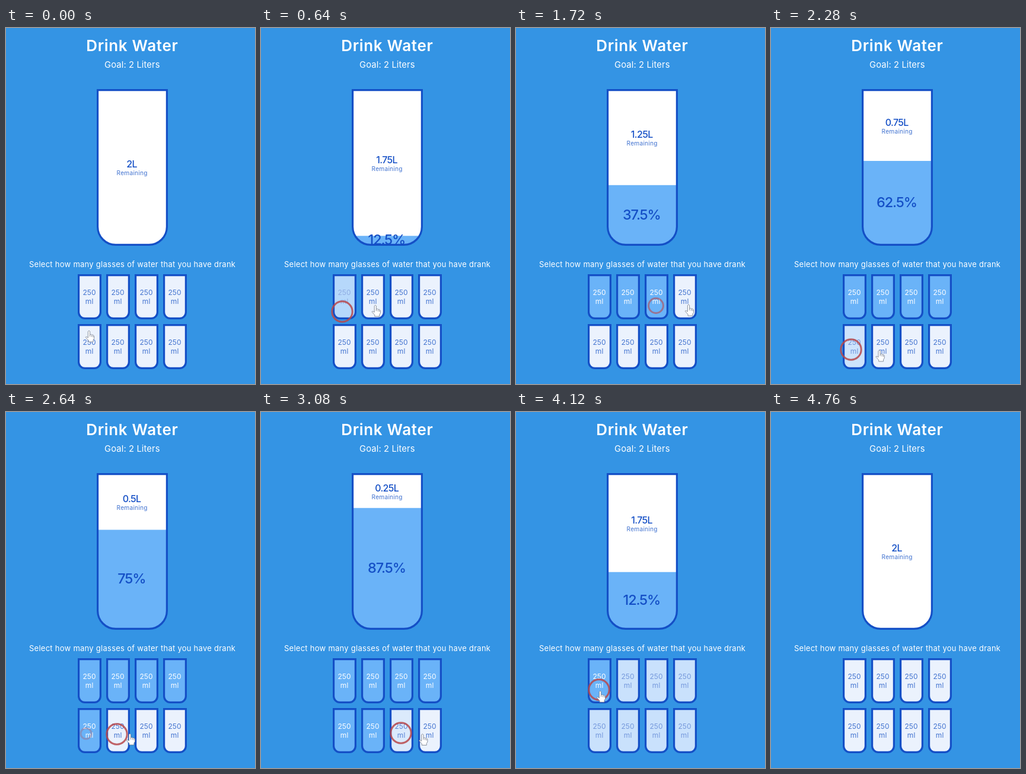
Animation of 420 by 600 pixels, one loop 5130 ms. Source, as an HTML page with a canvas:

```html
<!DOCTYPE html>
<html lang="en">
<head>
<meta charset="utf-8">
<title>Drink Water</title>
<style>
  html, body { margin: 0; width: 100%; height: 100%; overflow: hidden; background: #3494e4; }
  canvas { display: block; }
</style>
</head>
<body>
<canvas id="stage" width="420" height="600"></canvas>
<script>
const ctx = document.getElementById('stage').getContext('2d');

const LOOP = 5130, STEP = 40, TRANSITION = 300;
const BLUE = [20, 79, 198], SOFT_BLUE = [66, 115, 208], WHITE = [255, 255, 255];
const EMPTY = [235, 242, 253], WATER = [106, 179, 248];
const BORDER = 3.2;
const bottle = { x: 153, y: 103, w: 120, h: 264, r: 32 };
const innerTop = bottle.y + BORDER, innerBottom = bottle.y + bottle.h - BORDER;
const LABEL_HEIGHT = 31.5;

// Each click sets the number of full glasses.
const clicks = [
  [565, 1], [975, 2], [1395, 3], [1810, 4], [2228, 5],
  [2635, 6], [3045, 7], [3460, 8], [3988, 1], [4360, 0]
].map(([time, level]) => ({ time, level }));

// Pointer moves: start, duration, destination.
const startPoint = { x: 140, y: 510 };
const moves = [
  [40, 320, 137, 478], [505, 140, 193, 467], [915, 140, 236, 468],
  [1335, 140, 291, 466], [1840, 280, 135, 542], [2165, 140, 187, 543],
  [2575, 140, 236, 541], [2985, 140, 284, 543], [3540, 340, 140, 468],
  [4000, 90, 142, 470]
];

const handShape = new Path2D('M-1.6 1.4Q0-1.2 1.6 1.4V6.8L3.6 6.4 5 7.4 6.6 7.2 8.6 9V13.5L7 16V19H-1V16.5L-5.6 11.5Q-5.4 9-1.6 12ZM1.6 7V10M4.4 8V10.5M6.8 8.5V11');
const arrowShape = new Path2D('M0 0V14.5L3.4 11.5 5.8 17 8.4 16 6 10.6H10.6Z');

const clamp = v => Math.min(1, Math.max(0, v));
const lerp = (a, b, k) => a + (b - a) * k;
const smooth = k => k * k * (3 - 2 * k);
const rgb = c => `rgb(${c.map(Math.round).join()})`;
const mix = (a, b, k) => rgb(a.map((v, i) => lerp(v, b[i], k)));

// CSS "ease": cubic-bezier(.25, .1, .25, 1)
function ease(x) {
  if (x <= 0 || x >= 1) return clamp(x);
  const bezier = (a, b, s) => 3 * a * s * (1 - s) ** 2 + 3 * b * s * s * (1 - s) + s ** 3;
  let lo = 0, hi = 1;
  for (let i = 0; i < 24; i++) {
    const mid = (lo + hi) / 2;
    if (bezier(.25, .25, mid) < x) lo = mid; else hi = mid;
  }
  return bezier(.1, 1, lo);
}

function pointerAt(t) {
  let { x, y } = startPoint;
  for (const [start, duration, toX, toY] of moves) {
    const k = smooth(clamp((t - start) / duration));
    x = lerp(x, toX, k);
    y = lerp(y, toY, k);
  }
  return { x, y };
}

function stateAt(t) {
  let from = 0, level = 0, since = Infinity;
  for (const click of clicks) {
    if (t < click.time) break;
    from = level;
    level = click.level;
    since = t - click.time;
  }
  return { from, level, k: ease(since / TRANSITION) };
}

function text(str, x, baseline, size, color, weight = 400, spacing = 0.02) {
  ctx.font = `${weight} ${size}px Inter, "Open Sans", sans-serif`;
  ctx.letterSpacing = `${size * spacing}px`;
  ctx.fillStyle = color;
  ctx.textAlign = 'center';
  ctx.fillText(str, x + size * spacing / 2, baseline);
}

function glassPath({ x, y, w, h, r }, inset) {
  const radius = r - inset;
  ctx.beginPath();
  ctx.roundRect(x + inset, y + inset, w - 2 * inset, h - 2 * inset, [0, 0, radius, radius]);
}

function glassOutline(box) {
  glassPath(box, BORDER / 2);
  ctx.strokeStyle = rgb(BLUE);
  ctx.lineWidth = BORDER;
  ctx.stroke();
}

function drawBottle({ from, level, k }) {
  const space = innerBottom - innerTop;
  const limit = level === 8 ? space : space - LABEL_HEIGHT;
  const height = Math.min(limit, lerp(from, level, k) * bottle.h / 8);
  const top = innerBottom - height;

  ctx.save();
  glassPath(bottle, BORDER / 2);
  ctx.fillStyle = '#fff';
  ctx.fill();
  ctx.clip();
  if (height > 0) {
    ctx.fillStyle = rgb(WATER);
    ctx.fillRect(bottle.x, top, bottle.w, height + BORDER);
    const percent = (level || from) * 12.5;
    text(`${percent}%`, 212.5, (top + innerBottom) / 2 + 8.3, 23.5, rgb(BLUE), 500, -0.05);
  }
  if (level < 8) {
    const middle = (innerTop + top) / 2;
    text(`${2 - level / 4}L`, 212.5, middle - 0.2, 16, rgb(BLUE), 500, -0.04);
    text('Remaining', 212.5, middle + 12.8, 10.2, rgb(SOFT_BLUE));
  }
  ctx.restore();
  glassOutline(bottle);
}

function cupBox(i) {
  return { x: 121 + (i % 4) * 48, y: 415 + Math.floor(i / 4) * 84, w: 40, h: 76, r: 12 };
}

function drawCup(i, { from, level, k }) {
  const box = cupBox(i);
  const full = lerp(i < from ? 1 : 0, i < level ? 1 : 0, k);
  const color = mix(SOFT_BLUE, WHITE, full);
  glassPath(box, BORDER / 2);
  ctx.fillStyle = mix(EMPTY, WATER, full);
  ctx.fill();
  glassOutline(box);
  text('250', box.x + 19.5, box.y + 34.5, 12, color, 400, 0);
  text('ml', box.x + 19.5, box.y + 49.5, 12, color);
}

function drawRing(click, t) {
  const age = t - click.time;
  if (age < -85 || age >= 440) return;
  const k = clamp((440 - age) / 240);
  const { x, y } = pointerAt(click.time - 85);
  ctx.globalAlpha = 0.85 * Math.sqrt(k);
  ctx.strokeStyle = '#b8484c';
  ctx.lineWidth = 3;
  ctx.beginPath();
  ctx.arc(x, y, 8 + 9.2 * k, 0, Math.PI * 2);
  ctx.stroke();
  ctx.globalAlpha = 1;
}

function overCup({ x, y }) {
  for (let i = 0; i < 8; i++) {
    const b = cupBox(i);
    if (x >= b.x && x <= b.x + b.w && y >= b.y && y <= b.y + b.h) return true;
  }
  return false;
}

function drawPointer(t) {
  const { x, y } = pointerAt(t);
  // The hover shape lags slightly behind the movement.
  const shape = overCup(pointerAt(t - 100)) ? handShape : arrowShape;
  ctx.save();
  ctx.translate(x, y);
  ctx.fillStyle = '#fff';
  ctx.fill(shape);
  ctx.strokeStyle = '#6f7686';
  ctx.lineWidth = 0.8;
  ctx.lineJoin = 'round';
  ctx.stroke(shape);
  ctx.restore();
}

// The picture pauses briefly before the last glass finishes emptying.
function sceneTime(t) {
  if (t < 4520) return t;
  if (t < 4680) return 4480;
  return t < 4760 ? t - 120 : t;
}

function draw(elapsed) {
  const clock = Math.floor((elapsed % LOOP) / STEP) * STEP;
  const t = sceneTime(clock);
  const state = stateAt(t);

  ctx.fillStyle = '#3494e4';
  ctx.fillRect(0, 0, 420, 600);
  text('Drink Water', 212.5, 38.5, 26, '#fff', 600, 0.025);
  text('Goal: 2 Liters', 212.8, 67.3, 14.8, '#fff', 400, 0.006);
  text('Select how many glasses of water that you have drank', 213, 403.3, 13, '#fff');
  drawBottle(state);
  for (let i = 0; i < 8; i++) drawCup(i, state);
  if (clock < 4720) {
    clicks.forEach(click => drawRing(click, t));
    drawPointer(t);
  }
}

const began = performance.now();
function tick() {
  draw(performance.now() - began);
  requestAnimationFrame(tick);
}
tick();
</script>
</body>
</html>
```
